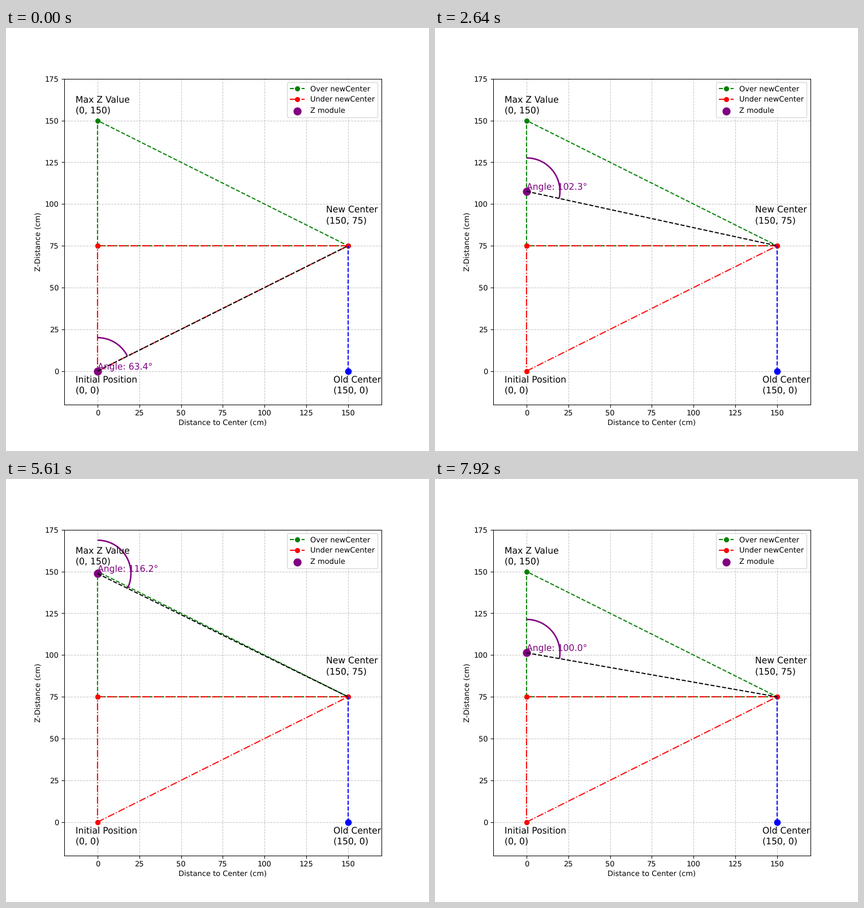
A matplotlib script that plays this animation: 748 by 748 pixels, repeating every 8000 ms.

```python
import numpy as np
import matplotlib.pyplot as plt
from matplotlib.animation import FuncAnimation

LOOP_MS = 8000
TICK_MS = 50
STEP_MS = 330          # the module moves in hard steps
CENTER = (150, 75)
Z_MAX = 150
ARC_RADIUS = 20

plt.rcParams["font.family"] = "DejaVu Sans"
plt.rcParams["text.hinting"] = "none"
fig, ax = plt.subplots(figsize=(8, 8), dpi=93.5)
ax.set_xlim(-20, 170)
ax.set_ylim(-20, 175)
ax.set_aspect("equal", adjustable="box")
ax.set_xticks(range(0, 151, 25))
ax.set_yticks(range(0, 176, 25))
ax.set_xlabel("Distance to Center (cm)")
ax.set_ylabel("Z-Distance (cm)")
ax.grid(True, linestyle="--", alpha=0.7)


def triangle(points, color, style, label):
    x, y = zip(*points, points[0])
    ax.plot(x, y, color=color, linestyle=style, marker="o", label=label)


def note(name, point, offset):
    ax.annotate(f"{name}\n({point[0]}, {point[1]})", point, xytext=offset,
                textcoords="offset points", fontsize=12, linespacing=1.3)


triangle([(0, 75), (0, Z_MAX), CENTER], "green", "--", "Over newCenter")
triangle([(0, 0), CENTER, (0, 75)], "red", "-.", "Under newCenter")
ax.plot([150, 150], [0, 75], color="blue", linestyle="--")
ax.lines[-1].set_data([150, 150], [0, 75])
ax.plot(150, 0, "o", color="blue", markersize=8)

note("Initial Position", (0, 0), (-30, -30))
note("Max Z Value", (0, Z_MAX), (-30, 10))
note("New Center", CENTER, (-30, 30))
note("Old Center", (150, 0), (-20, -30))

module = ax.scatter([0], [0], s=100, linewidths=1, color="purple",
                    zorder=2.5, label="Z module")
beam, = ax.plot([], [], color="black", linestyle="--", zorder=2.6)
arc, = ax.plot([], [], color="purple", linewidth=2,
               solid_capstyle="butt", zorder=2.2)
label = ax.text(0, 0, "", color="purple", fontsize=12, va="bottom")
ax.legend(loc="upper right", labelspacing=0.54)


def update(i):
    step = (i * TICK_MS + TICK_MS - 10) // STEP_MS
    z = Z_MAX * np.sin(0.1 * step)
    angle = np.arctan2(CENTER[0], CENTER[1] - z)   # measured from vertical
    sweep = np.linspace(0, angle, 100)

    module.set_offsets([(0, z)])
    beam.set_data([0, CENTER[0]], [z, CENTER[1]])
    arc.set_data(ARC_RADIUS * np.sin(sweep), z + ARC_RADIUS * np.cos(sweep))
    label.set_position((0, z))
    label.set_text(f"Angle: {np.degrees(angle):.1f}°")
    return module, beam, arc, label


anim = FuncAnimation(fig, update, frames=LOOP_MS // TICK_MS,
                     interval=TICK_MS, repeat=True, repeat_delay=0)
plt.show()
```
